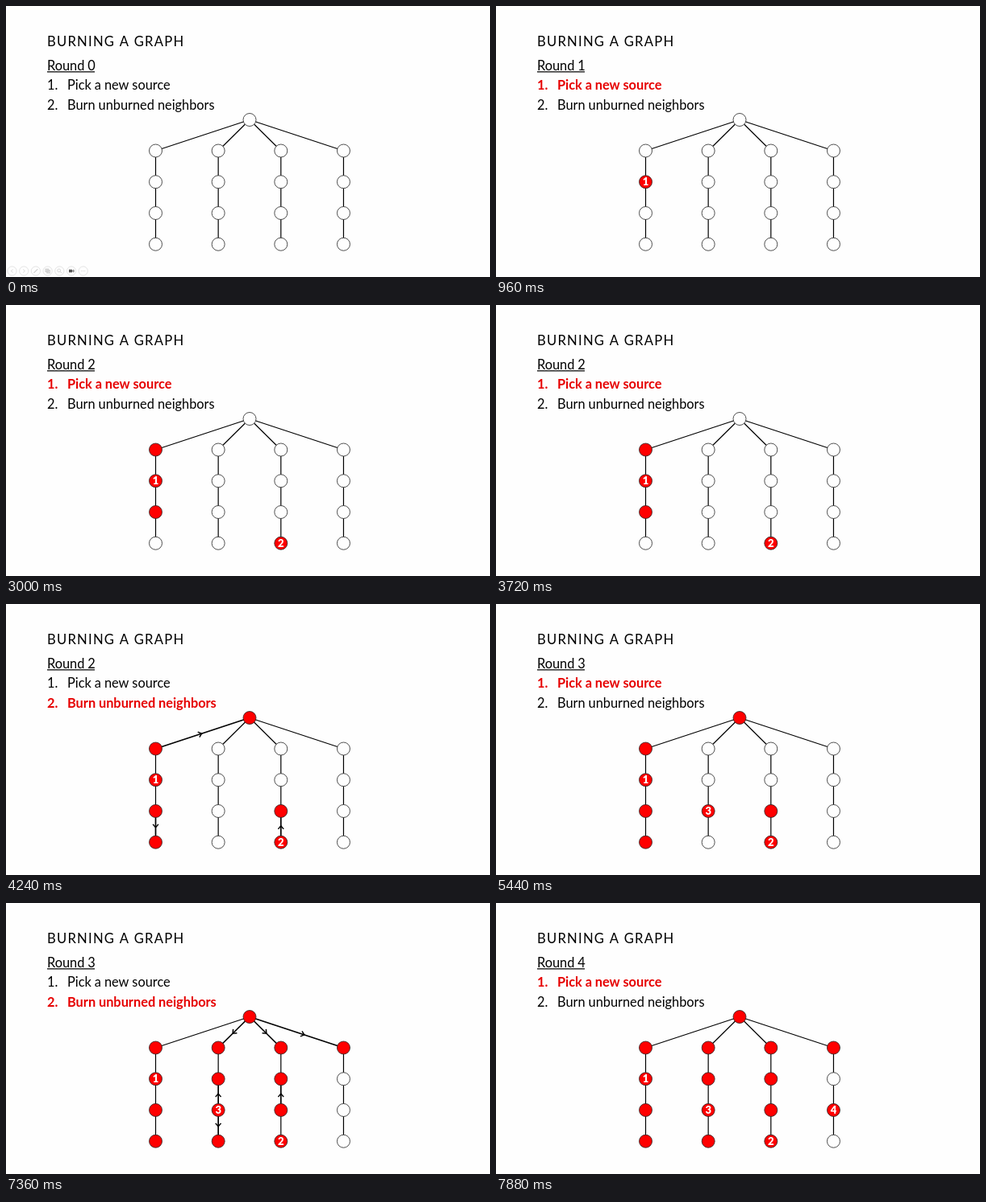
An HTML page with a canvas that plays this animation: 600 px wide and 337 px high, repeating every 8000 ms.

```html
<!DOCTYPE html>
<html lang="en">
<head>
<meta charset="utf-8">
<title>Burning a graph</title>
<style>
html, body { margin: 0; width: 100%; height: 100%; overflow: hidden; background: #fefefe; }
canvas { display: block; width: 600px; height: 337px; }
</style>
</head>
<body>
<canvas id="stage"></canvas>
<script>
const W = 600, H = 337, LOOP = 8000;
const cuts = [720, 1880, 3000, 4080, 5280, 6400, 7520];
const PAPER = '#fefefe', TEXT_RED = '#e60000', NODE_RED = '#ff0000';
const FONT = 'Carlito, Lato, sans-serif';
const BODY = 16.35;

const canvas = document.getElementById('stage');
const ctx = canvas.getContext('2d');
const dpr = window.devicePixelRatio || 1;
canvas.width = W * dpr;
canvas.height = H * dpr;

// Each node holds the step at which it catches fire; odd steps pick a source.
const NEVER = 99;
const root = { x: 302, y: 141.5, burn: 4 };
const nodes = [root], edges = [];
[[2, 1, 2, 4], [6, 6, 5, 6], [6, 6, 4, 3], [6, NEVER, 7, NEVER]].forEach((column, c) => {
  let above = root;
  column.forEach((burn, r) => {
    const node = { x: 185.5 + c * 77.65, y: 180 + r * 38.75, burn };
    nodes.push(node);
    edges.push([above, node]);
    above = node;
  });
});

function text(str, x, y, size, opt = {}) {
  ctx.font = `${opt.weight || 400} ${size}px ${FONT}`;
  ctx.fillStyle = opt.color || '#000';
  ctx.textAlign = opt.align || 'left';
  ctx.letterSpacing = (opt.letter || 0) + 'px';
  ctx.wordSpacing = (opt.word || 0) + 'px';
  ctx.fillText(str, x, y);
}

function line(points, width, color = '#000') {
  ctx.beginPath();
  points.forEach(([x, y]) => ctx.lineTo(x, y));
  ctx.lineWidth = width;
  ctx.strokeStyle = color;
  ctx.stroke();
}

function circle(x, y, r, fill, stroke, width) {
  ctx.beginPath();
  ctx.arc(x, y, r, 0, Math.PI * 2);
  if (fill) { ctx.fillStyle = fill; ctx.fill(); }
  if (stroke) { ctx.strokeStyle = stroke; ctx.lineWidth = width; ctx.stroke(); }
}

function item(num, label, y, active) {
  const opt = { word: -0.2 };
  if (active) Object.assign(opt, { weight: 700, color: TEXT_RED });
  text(num + '.', 51, y, BODY, opt);
  text(label, 76, y, BODY, opt);
}

// The head sits a little past the middle of longer edges.
function arrow(from, to) {
  const dx = to.x - from.x, dy = to.y - from.y;
  const f = to === root ? 0.49 : 0.5 + Math.hypot(dx, dy) / 1500;
  line([[from.x, from.y], [to.x, to.y]], 1.7);
  ctx.save();
  ctx.translate(from.x + dx * f, from.y + dy * f);
  ctx.rotate(Math.atan2(dy, dx));
  line([[-4, -3.4], [0, 0], [-4, 3.4]], 1.5);
  ctx.restore();
}

function graph(step) {
  for (const [a, b] of edges) {
    const [from, to] = a.burn < b.burn ? [a, b] : [b, a];
    const spreads = step > 0 && step % 2 === 0 && to.burn === step && from.burn < step;
    if (spreads) arrow(from, to);
    else line([[a.x, a.y], [b.x, b.y]], 1.2);
  }
  for (const n of nodes) {
    const lit = n.burn <= step;
    circle(n.x, n.y, 8, lit ? NODE_RED : PAPER, '#222', 0.8);
    if (lit && n.burn % 2) {
      text((n.burn + 1) / 2, n.x, n.y + 4.6, 13, { weight: 900, color: '#fff', align: 'center' });
    }
  }
}

function controls(alpha) {
  if (alpha <= 0) return;
  const y = 329.5, ink = '#cfcfcf';
  const cx = i => 7.5 + i * 14.7;
  ctx.save();
  ctx.globalAlpha = alpha;
  for (let i = 0; i < 7; i++) circle(cx(i), y, 5.6, null, '#dcdcdc', 0.8);
  line([[cx(0) + 1, y - 2], [cx(0) - 1.2, y], [cx(0) + 1, y + 2]], 0.8, ink);
  line([[cx(1) - 1, y - 2], [cx(1) + 1.2, y], [cx(1) - 1, y + 2]], 0.8, ink);
  line([[cx(2) - 2.4, y + 2.4], [cx(2) + 2.4, y - 2.4]], 1.3, ink);
  ctx.strokeRect(cx(3) - 2.5, y - 2.3, 3.4, 3.2);
  ctx.strokeRect(cx(3) - 0.8, y - 0.8, 3.4, 3.2);
  circle(cx(4) - 0.6, y - 0.6, 1.9, null, ink, 0.8);
  line([[cx(4) + 0.8, y + 0.8], [cx(4) + 2.6, y + 2.6]], 0.9, ink);
  ctx.fillStyle = '#555';
  ctx.fillRect(cx(5) - 3, y - 1.8, 4, 3.6);
  line([[cx(5) + 1.2, y], [cx(5) + 3, y - 1.5], [cx(5) + 3, y + 1.5], [cx(5) + 1.2, y]], 0.8, '#555');
  for (let d = -2; d <= 2; d += 2) circle(cx(6) + d, y, 0.55, ink);
  ctx.restore();
}

function draw(t) {
  const step = cuts.filter(c => t >= c).length;
  ctx.setTransform(dpr, 0, 0, dpr, 0, 0);
  ctx.fillStyle = PAPER;
  ctx.fillRect(0, 0, W, H);

  text('BURNING A GRAPH', 51, 49.6, 16.6, { letter: 1.25 });
  text('Round ' + Math.ceil(step / 2), 51, 79.7, BODY, { word: -0.2 });
  line([[51, 81.9], [110, 81.9]], 1.1);
  item(1, 'Pick a new source', 104.4, step % 2 === 1);
  item(2, 'Burn unburned neighbors', 129.4, step > 0 && step % 2 === 0);

  graph(step);
  controls(1 - Math.max(0, t - cuts[0]) / 200);
}

const start = performance.now();
function tick() {
  draw((performance.now() - start) % LOOP);
  requestAnimationFrame(tick);
}
tick();
</script>
</body>
</html>
```
